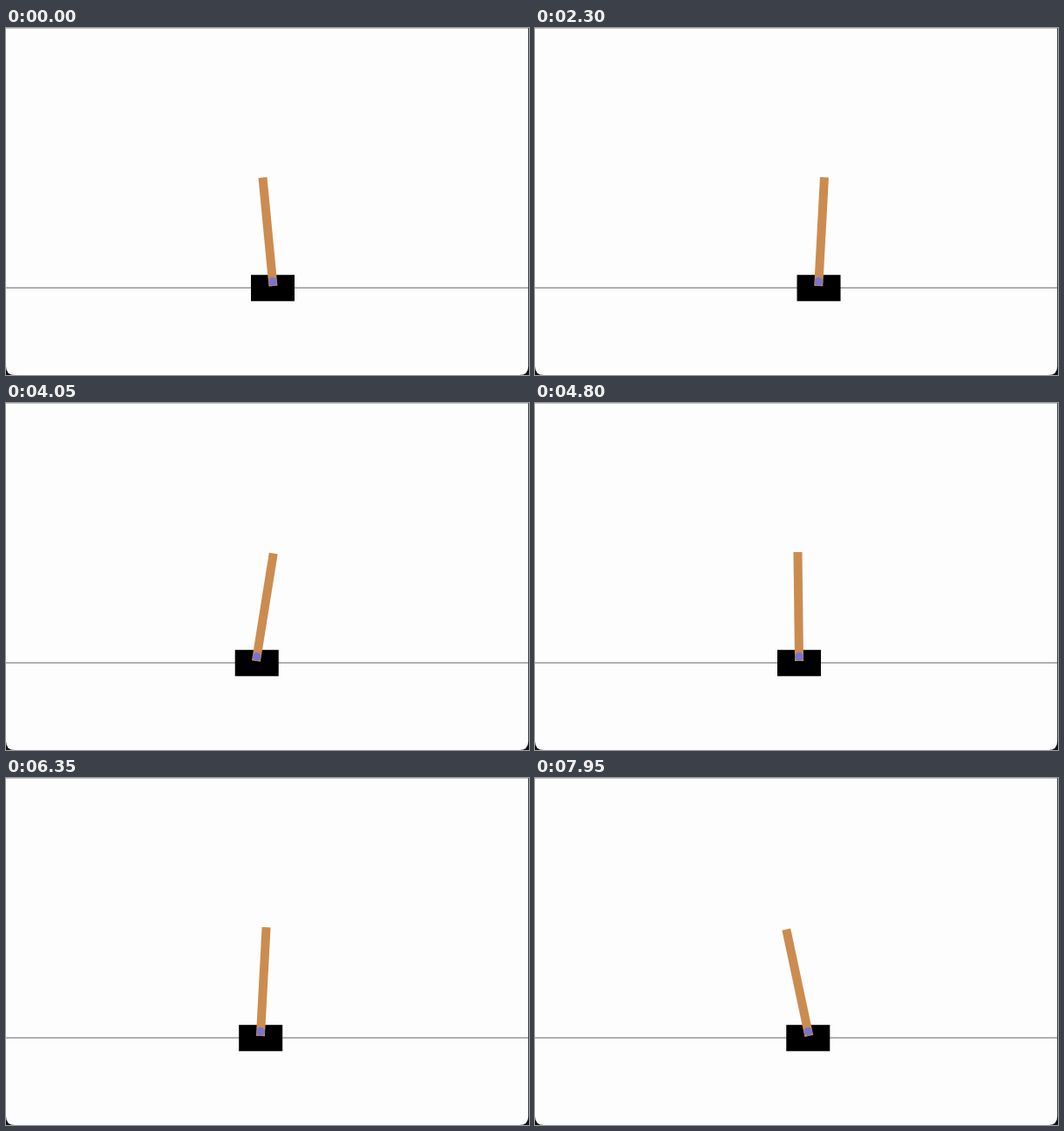
Animation of 600x398 px, one loop 8000 ms. Source, as an HTML page:

```html
<!DOCTYPE html>
<html lang="en">
<head>
<meta charset="utf-8">
<title>Cart and pole</title>
<style>
  html, body { margin: 0; width: 100%; height: 100%; overflow: hidden; background: #111; }
  svg { display: block; width: 600px; height: 398px; }
</style>
</head>
<body>
<svg viewBox="0 0 600 398">
  <path d="M0 0H599.2V388Q599.2 398 589 398H10Q0 398 0 388Z" fill="#fdfdfd"/>
  <rect width="599" height="1" fill="#c8c8c8"/>
  <rect y="297.5" width="599" height="1" fill="#666"/>
  <g id="cart">
    <rect x="-25" y="283.2" width="50" height="30.1"/>
    <g id="pole">
      <rect x="-5" y="171" width="10" height="125" fill="#cb8c50"/>
      <circle cy="291" r="4.9" fill="#7b74cb"/>
    </g>
  </g>
</svg>
<script>
const STEP = 50, LOOP = 8000;
const COUPLING = 1.454; // px the cart moves against each degree of tilt

const swing = halfTurns => Math.cos(Math.PI * halfTurns);
const ramp = u => Math.min(1, Math.max(0, u));

// Each run balances the pole about a slowly drifting centre until it restarts.
const runs = [
  {
    start: 0,
    centre: t => 298 + 0.45 * t + 11.3 * (t / 46) ** 4,
    angle: t => -5.5 * swing(t / 4.94)
  },
  {
    start: 60,
    centre: () => 301,
    angle: t => 12.5 * ramp((t - 60) / 6) * swing((t - 67.8) / 7.5)
  },
  {
    start: 95,
    centre: t => 298 - 7 * swing((t - 115) / 27.5),
    angle: t => {
      const s = t - 115;
      return -12 * ramp((t - 95) / 16) * swing(s * (0.1114 + 0.000568 * s));
    }
  }
];

const cart = document.getElementById("cart");
const pole = document.getElementById("pole");
let begin;

function draw(now) {
  begin ??= now;
  const t = Math.floor(((now - begin) % LOOP) / STEP);
  const run = runs.findLast(r => r.start <= t);
  const angle = run.angle(t);
  const x = run.centre(t) - COUPLING * angle;
  cart.setAttribute("transform", `translate(${x.toFixed(2)} 0)`);
  pole.setAttribute("transform", `rotate(${angle.toFixed(2)} 0 291)`);
  requestAnimationFrame(draw);
}
requestAnimationFrame(draw);
</script>
</body>
</html>
```
